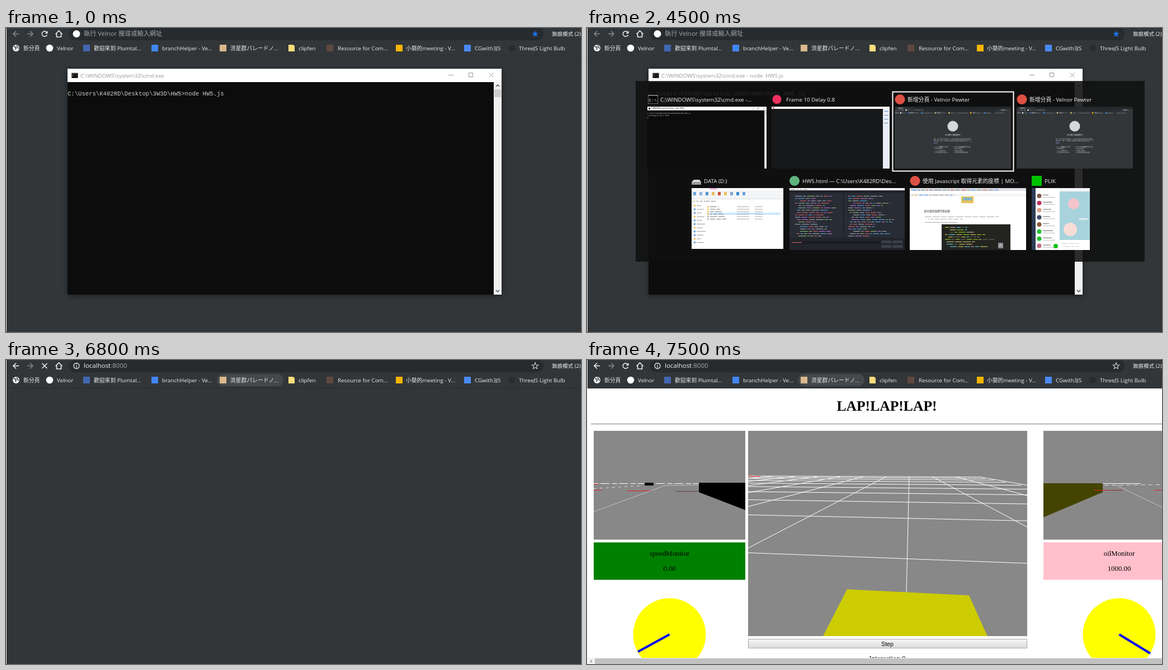
Recreate the animation shown at these times as an HTML page with a canvas. Size 1028x545 px, loop 8 s.

```html
<!DOCTYPE html>
<html lang="zh-Hant">
<head>
<meta charset="utf-8">
<title>Desktop session</title>
<style>
html, body { margin: 0; width: 100%; height: 100%; overflow: hidden; background: #323639; }
canvas { display: block; }
</style>
</head>
<body>
<canvas id="stage" width="1028" height="545"></canvas>
<script>
const g = document.getElementById('stage').getContext('2d');
const CJK = "'Noto Sans CJK TC','Noto Sans CJK JP','Noto Sans CJK',sans-serif";
const UI = "'Open Sans'," + CJK;
const ROBOTO = 'Roboto,' + CJK;
const SERIF = "'Liberation Serif',serif";
const MONO = "'Liberation Mono',monospace";
const DARK = '#323639';
const PROMPT = 'C:\\Users\\K482RD\\Desktop\\3W3D\\HW5>node HW5.js';

// ---------- helpers ----------
function rect(x, y, w, h, c) { g.fillStyle = c; g.fillRect(x, y, w, h); }
function frame(x, y, w, h, c, lw = 1) { g.strokeStyle = c; g.lineWidth = lw; g.strokeRect(x, y, w, h); }
function disc(x, y, r, c) { g.fillStyle = c; g.beginPath(); g.arc(x, y, r, 0, 7); g.fill(); }
function ring(x, y, r, c, lw, a = 0, b = 2 * Math.PI) {
  g.strokeStyle = c; g.lineWidth = lw; g.beginPath(); g.arc(x, y, r, a, b); g.stroke();
}
function pill(x, y, w, h, r, c) { g.fillStyle = c; g.beginPath(); g.roundRect(x, y, w, h, r); g.fill(); }
function path(p) {
  g.beginPath();
  for (let i = 0; i < p.length; i += 2) g.lineTo(p[i], p[i + 1]);
}
function poly(c, ...p) { path(p); g.fillStyle = c; g.fill(); }
function stroke(c, lw, ...p) { path(p); g.strokeStyle = c; g.lineWidth = lw; g.stroke(); }
function dotted(dash, c, lw, ...p) { g.setLineDash(dash); stroke(c, lw, ...p); g.setLineDash([]); }
function text(s, x, y, c, size = 9.8, font = UI, align = 'left') {
  g.font = (typeof size === 'number' ? size + 'px ' : size + ' ') + font;
  g.fillStyle = c; g.textAlign = align; g.fillText(s, x, y);
  return x + g.measureText(s).width;
}
function clipped(x, y, w, h, draw) {
  g.save(); g.beginPath(); g.rect(x, y, w, h); g.clip(); draw(); g.restore();
}
function mini(x, y, w, h, scale, dx, dy, draw) {
  clipped(x, y, w, h, () => { g.translate(dx, dy); g.scale(scale, scale); draw(); });
}
function random(seed) {
  return () => (seed = (seed * 16807) % 2147483647) / 2147483647;
}
// rows of short coloured dashes that read as tiny text
function scribble(x, y, w, rows, step, colors, seed) {
  const rnd = random(seed);
  for (let i = 0; i < rows; i++) {
    let px = x + Math.floor(rnd() * 4) * 3;
    const end = x + w * (0.35 + 0.6 * rnd());
    while (px < end) {
      const len = 3 + rnd() * 11;
      rect(px, y + i * step, Math.min(len, end - px), 1, colors[Math.floor(rnd() * colors.length)]);
      px += len + 2;
    }
  }
}

// ---------- browser ----------
function star(x, y, c, filled) {
  const p = [];
  for (let i = 0; i < 10; i++) {
    const r = i % 2 ? 2.6 : 6, a = i * Math.PI / 5 - Math.PI / 2;
    p.push(x + r * Math.cos(a), y + r * Math.sin(a));
  }
  path(p); g.closePath();
  if (filled) { g.fillStyle = c; g.fill(); }
  else { g.strokeStyle = c; g.lineWidth = 1.1; g.stroke(); }
}
function arrow(x, dir, c) {
  stroke(c, 1.6, x - 5 * dir, 10.5, x + 5 * dir, 10.5);
  stroke(c, 1.6, x, 5.5, x + 5 * dir, 10.5, x, 15.5);
}
function bookmarks(hover) {
  if (hover) pill(377, 25, 119, 22, 11, '#45484b');
  const label = (s, x) => text(s, x, 39.7, '#eceded');
  const box = (x, c) => rect(x - 6, 30, 12, 12, c);
  disc(18, 36, 6, '#f1f1f1');
  stroke(DARK, 1.5, 14, 33, 18, 35, 17, 39);
  stroke(DARK, 1.5, 19, 31, 21, 35, 23, 37);
  disc(78, 36, 6.3, '#fff');
  box(144, '#4267b2'); box(266, '#4285f4'); box(388, '#d9b98c');
  poly('#fbdc7c', 505, 30, 513, 30, 516, 32, 516, 42, 505, 42);
  box(579, '#5f483f'); box(703, '#f4b400'); box(825, '#4a8af4');
  disc(904, 36, 6, '#292c2f');
  label('新分頁', 31);
  label('Velnor', 91);
  label('歡迎來到 Plumtal...', 157);
  label('branchHelper - Ve...', 279);
  label('流星群パレードノ...', 401);
  label('clipfen', 523);
  label('Resource for Com...', 593);
  label('小葵的meeting - V...', 715);
  label('CGwith3JS', 838);
  label('ThreeJS Light Bulb', 917);
}
function newTab() {
  disc(543, 155.5, 47.5, '#d6d7d8');
  text('你已進入無痕模式', 543, 239, '#e0e1e2', '300 17.3px', CJK, 'center');
  const grey = '#b9bcbf', white = '#f4f4f4', link = '#8ab4f8';
  const put = (s, x, y, c = grey) => text(s, x, y, c, 11.1, ROBOTO);
  put('現在，你可以進行私密瀏覽了。共用這部裝置的其他使用者不會看到', 372, 276);
  put('你的活動，不過，你下載的內容和新增的書籤仍會保留在裝置上。', 372, 292);
  put('瞭', 697, 292, link);
  put('解詳情', 372, 308, link);
  put('Pewter', 372, 343);
  put('下列資訊：', put('不會儲存', 414, 343, white), 343);
  put('你的活動：', put('可能仍會看到', put('以下各方', 546, 343), 343, white), 343);
  const list = (x, items) => items.forEach((s, i) => {
    disc(x - 10, 358.5 + 16 * i, 1.7, grey);
    put(s, x, 362 + 16 * i);
  });
  list(385, ['你的瀏覽記錄', 'Cookie 和網站資料', '你在表單中輸入的資訊']);
  list(558, ['你造訪的網站', '你的雇主或學校', '你的網際網路服務供應商']);
}
function popup() {
  g.save();
  g.shadowColor = 'rgba(0,0,0,.45)'; g.shadowBlur = 6; g.shadowOffsetY = 1;
  pill(107, -4, 859, 210, 10, '#292c2f');
  g.restore();
  rect(107, 27, 859, 29, '#45484b');
  ['localhost:8000', 'localhost:8000 - Velnor 搜尋', 'localhost:3000', 'localhost', 'location', 'local storage']
    .forEach((s, i) => {
      const y = 41.5 + 29 * i;
      ring(125, y - 1, 3.6, '#9aa0a6', 1.3);
      stroke('#9aa0a6', 1.3, 128, y + 2, 131, y + 5);
      text(s, 139, y + 4, i % 2 ? '#dfe1e3' : '#8ab4f8', 11.5);
    });
}
function address(t) {
  const open = t >= 5400 && t < 6500, typing = t >= 5400 && t < 6600;
  const focus = t >= 4600 && t < 6600;
  if (open) popup();
  else pill(112, -1, 849, 23, 11.5, focus ? '#34383b' : '#282b2e');
  if (focus && !open) {
    g.strokeStyle = '#6a7d9b'; g.lineWidth = 2;
    g.beginPath(); g.roundRect(112, -1, 848, 22.5, 11.2); g.stroke();
  }
  if (t < 5400) disc(126, 10.5, 6.5, '#fff');
  else {
    ring(126, 10.5, 5, '#e4e5e6', 1.3);
    rect(125.4, 9.7, 1.3, 4, '#e4e5e6'); rect(125.4, 7.3, 1.3, 1.4, '#e4e5e6');
  }
  if (t < 4600) text('執行 Velnor 搜尋或輸入網址', 139, 14.3, '#a3a6a9', 11.2);
  else if (t >= 4700 && t < 5200) rect(139, 2, 1, 15, '#fff');
  if (typing) {
    const url = 'localhost:8000', n = Math.min(4, 1 + Math.floor((t - 5400) / 100));
    const x = text(url.slice(0, n), 139, 14, '#fff', 11.5);
    rect(x, 2, g.measureText(url.slice(n)).width, 16, '#4a78b8');
    text(url.slice(n), x, 14, '#fff', 11.5);
  } else if (t >= 6600) {
    text(':8000', text('localhost', 139, 14, '#f4f4f4', 11.5), 14, '#a3a6a9', 11.5);
  }
  if (!typing) star(946, 10.8, t < 5400 ? '#1a73e8' : '#d5d7d9', t < 5400);
}
function browser(t) {
  rect(0, 0, 1028, 545, DARK);
  if (t < 6800) newTab();
  else if (t >= 6900) page(t >= 7400);
  rect(0, 0, 1028, 51, DARK);
  rect(0, 50, 1028, 1, '#2a2d30');
  arrow(18, -1, t >= 6800 ? '#f1f1f1' : '#85888b');
  arrow(43, 1, '#85888b');
  if (t >= 6600 && t < 7500) {
    stroke('#f1f1f1', 1.6, 64.5, 6, 73.5, 15);
    stroke('#f1f1f1', 1.6, 73.5, 6, 64.5, 15);
  } else {
    ring(69, 10.5, 4.7, '#f1f1f1', 1.6, 0.4, 5.5);
    poly('#f1f1f1', 74.5, 5, 74.5, 10, 69.5, 10);
  }
  stroke('#f1f1f1', 1.6, 88.5, 11, 94.5, 5, 100.5, 11);
  stroke('#f1f1f1', 1.6, 90.5, 10, 90.5, 16, 98.5, 16, 98.5, 10);
  text('無痕模式 (2)', 976, 14, '#f1f1f1', 9.5);
  bookmarks(t >= 4600);
  address(t);
  rect(0, 0, 1, 545, '#f0f0f0');
}

// ---------- web page ----------
function roadView() {
  clipped(288, 127, 499, 368, () => {
    rect(288, 127, 499, 368, '#888');
    const vx = 576.5, vy = 187.5;
    const slope = k => 1.905 * k - 0.024;
    for (let k = -7; k <= 3; k++)
      stroke('#fff', 1, vx + slope(k) * 21.5, vy + 21.5, vx + slope(k) * 400, vy + 400);
    for (let j = 0; j < 10; j++) {
      const h = 1 / (0.00597 + 0.0045 * j);
      const at = k => {
        const x = vx + slope(k) * h;
        return [x, vy + h * (1 + 0.000227 * (x - 537))];
      };
      stroke('#fff', 1, ...at(-7), ...at(3));
    }
    stroke('#e02020', 1, 288, 208.5, 310, 208.5);
    poly('#cc0', 465, 411, 683, 422, 716, 495, 422, 495);
  });
}
function sideViews() {
  const red = (x1, x2, y, c = '#e02020') => stroke(c, 1, x1, y, x2, y);
  rect(12, 127, 271, 195, '#888');
  dotted([9, 3, 16, 5], '#fff', 1, 12, 221.5, 200, 221.5);
  dotted([5, 6], '#ddd', 1, 12, 230.5, 95, 225.5);
  dotted([1, 1], '#fff', 1, 12, 272, 140, 225, 200, 224);
  red(12, 20, 222.5);
  red(12, 26, 233.5);
  red(71, 114, 234.5);
  red(158, 200, 235.5, '#6b4444');
  rect(103, 220, 16, 5, '#000');
  poly('#000', 200, 220, 283, 220, 283, 269, 200, 237);

  rect(816, 127, 212, 195, '#888');
  stroke('#fff', 1, 922, 221.5, 990, 221.5);
  dotted([8, 5], '#ddd', 1, 925, 224.5, 1028, 223.5);
  dotted([1, 1], '#fff', 1, 945, 224, 1028, 264);
  poly('#440', 816, 221, 922, 221, 922, 237, 816, 282);
  red(906, 934, 233.5);
  red(934, 958, 233.5, '#8a3030');
  red(1014, 1028, 233.5);
}
function gauge(x, nx, ny) {
  disc(x, 492, 65, '#ff0');
  stroke('#00f', 4, x, 492, nx, ny);
}
function page(ready) {
  const label = (s, x, y) => text(s, x, y, '#000', 12.8, SERIF, 'center');
  rect(0, 51, 1028, 494, '#fff');
  text('LAP!LAP!LAP!', 536, 91, '#000', 'bold 25.6px', SERIF, 'center');
  rect(7, 114, 1021, 1, '#8c8c8c');
  rect(7, 115, 1021, 1, '#e4e4e4');
  const h = ready ? 67 : 195;
  rect(12, 327, 271, h, '#008000');
  rect(816, 327, 212, h, '#ffc0cb');
  label('speedMonitor', 147.5, 351);
  label('oilMonitor', 951.5, 351);
  if (ready) {
    sideViews();
    roadView();
    label('0.00', 147.5, 378);
    label('1000.00', 951.5, 378);
    gauge(147.5, 91, 523);
    gauge(951.5, 1007, 526);
    label('Interaction 0', 537, 539);
  } else {
    rect(12, 127, 271, 195, '#f00');
    rect(816, 127, 212, 195, '#00f');
  }
  const fill = g.createLinearGradient(0, 500, 0, 517);
  fill.addColorStop(0, '#f6f6f6');
  fill.addColorStop(1, '#dcdcdc');
  rect(288, 500, 499, 17, fill);
  frame(288.5, 500.5, 498, 16, '#a8a8a8');
  text('Step', 537, 512.7, '#000', 10.7, "'Liberation Sans',sans-serif", 'center');
  rect(0, 534, 1028, 11, '#f1f1f1');
  rect(14, 535, 1014, 10, '#c1c1c1');
  poly('#a3a3a3', 5, 540, 8.5, 537, 8.5, 543);
}

// ---------- console ----------
function consoleIcon(x, y, w, h) {
  rect(x, y, w, h, '#9a9a9a');
  rect(x + 0.7, y + 1.5, w - 1.4, h - 2.2, '#000');
  text('C:\\', x + 1.5, y + h * 0.72, '#fff', h * 0.5, MONO);
}
function consoleWindow(t) {
  const active = t >= 2000 && t < 3900;
  g.save();
  g.shadowColor = 'rgba(0,0,0,.45)'; g.shadowBlur = 9; g.shadowOffsetY = 2;
  rect(110, 73, 776, 405, '#0c0c0c');
  g.restore();
  rect(110, 73, 776, 24, '#fff');
  consoleIcon(117, 80, 12, 10);
  const ink = active ? '#000' : '#999';
  text('C:\\WINDOWS\\system32\\cmd.exe' + (t >= 2600 ? ' - node  HW5.js' : ''), 133, 88.5, ink);
  rect(791, 84, 9, 1, ink);
  frame(827.5, 80.5, 7, 7, ink);
  stroke(ink, 1, 863.5, 80.5, 871.5, 88.5);
  stroke(ink, 1, 871.5, 80.5, 863.5, 88.5);
  rect(872, 97, 14, 381, '#f0f0f0');
  rect(873, 110, 12, 14, '#cdcdcd');
  stroke('#505050', 1.5, 876, 105, 879, 102, 882, 105);
  stroke('#505050', 1.5, 876, 470, 879, 473, 882, 470);
  const put = (s, y) => text(s, 110, y, '#ccc', 10.6, MONO);
  put(PROMPT, 120.5);
  if (t >= 3100) put('Listening on port 8000', 135.5);
  if (t >= 2400 && t < 2600) rect(390, 119, 6, 3, '#ccc');
  if (t >= 2600 && t < 2900) rect(110, 132, 7, 3, '#ccc');
  if (t >= 3100) rect(110, 145, 7, 3, '#ccc');
  if (active) frame(109.5, 72.5, 777, 406, '#1883d7');
}

// ---------- task switcher ----------
function browserThumb(x) {
  rect(x, 141, 208, 111, DARK);
  mini(x, 141, 208, 111, 0.2, x - 4.6, 145, () => browser(0));
  rect(x, 141, 208, 4, '#24272a');
  rect(x + 3, 142, 30, 3, DARK);
  rect(x + 6, 143, 9, 1, '#bbb');
}
function explorerThumb() {
  rect(187, 287, 164, 109, '#fff');
  rect(220, 287, 12, 3, '#f3b6e6');
  rect(187, 291, 164, 15, '#f3f4f5');
  ['#6aa4dc', '#8ab6e0', '#5b93cf', '#e8bf5a', '#d04a3a', '#e8bf5a', '#7fa7d0', '#3d8ad0', '#6aa4dc']
    .forEach((c, i) => rect(190 + 11 * i, 294, 5, 6, c));
  rect(187, 306, 164, 1, '#ddd');
  scribble(190, 310, 60, 1, 3, ['#888'], 4);
  for (let i = 0; i < 11; i++) {
    rect(191, 317 + 6.6 * i, 3, 3, i % 3 ? '#5a9ad8' : '#e8bf5a');
    rect(196, 318 + 6.6 * i, 8 + (i * 5) % 9, 1, '#999');
  }
  rect(214, 331, 132, 4, '#cce8ff');
  for (let i = 0; i < 6; i++) {
    rect(215, 319 + 4.4 * i, 3, 3, i < 4 ? '#f3cf72' : '#b8c4d0');
    scribble(220, 320 + 4.4 * i, 34, 1, 4, ['#777'], 9 + i);
    rect(268, 320 + 4.4 * i, 22, 1, '#aaa');
    rect(300, 320 + 4.4 * i, 14, 1, '#aaa');
  }
}
function editorThumb() {
  const inks = ['#c678dd', '#98c379', '#61afef', '#abb2bf', '#e06c75', '#abb2bf'];
  rect(362, 287, 206, 111, '#282c34');
  rect(362, 287, 206, 4, '#fff');
  scribble(364, 289, 60, 1, 3, ['#777'], 2);
  rect(362, 291, 206, 5, '#21252b');
  rect(458, 291, 1, 85, '#181a1f');
  scribble(372, 301, 82, 18, 4.2, inks, 21);
  scribble(467, 301, 96, 18, 4.2, inks, 57);
  rect(362, 376, 206, 22, '#21252b');
  rect(364, 382, 160, 5, '#1b1d23');
  rect(366, 384, 18, 1, '#e06c75');
  for (let i = 0; i < 4; i++) rect(526 + 20 * (i % 2), 381 + 8 * (i >> 1), 18, 5, '#3a3f4b');
}
function articleThumb() {
  rect(577, 287, 208, 111, '#fff');
  rect(577, 287, 208, 5, '#dee1e6');
  rect(577, 297, 208, 5, '#f4f5f6');
  scribble(580, 290, 190, 1, 3, ['#6f7780', '#d04a3a', '#4285f4'], 6);
  scribble(580, 299, 200, 1, 3, ['#888', '#4285f4', '#d9a441'], 8);
  rect(669, 302, 22, 12, '#e6c35c');
  rect(672, 304, 16, 5, '#7fb3c8');
  text('如何取得座標的程式碼', 603, 330, '#333', '500 4.6px', CJK);
  scribble(604, 338, 170, 2, 4, ['#aaa'], 13);
  rect(604, 348, 58, 1, '#aaa');
  rect(634, 352, 123, 46, '#23241f');
  scribble(640, 357, 100, 9, 4.3, ['#66d9ef', '#a6e22e', '#e6db74', '#cfcfc2', '#75715e'], 31);
  rect(735, 385, 9, 10, '#8a8f94');
  stroke('#fff', 1, 737, 391, 739.5, 388.5, 742, 391);
}
function chatThumb() {
  rect(795, 287, 104, 111, '#fff');
  rect(795, 287, 7, 111, '#2d3b55');
  ['#7d5a4c', '#b8315a', '#d8a08c', '#3f4b6b', '#8b5a3a', '#20c030', '#20c030', '#c06a80'].forEach((c, i) => {
    const y = 301 + 12.8 * i;
    disc(808.5, y, 4, c);
    rect(815, y - 2, 10 + (i * 7) % 9, 1, '#666');
    rect(815, y + 2, 22, 1, '#bbb');
  });
  disc(838, 391, 4, '#06c013');
  rect(845, 293, 54, 87, '#a8d3dc');
  rect(845, 287, 54, 6, '#f4f5f6');
  disc(870, 315, 10, '#f5c3cc');
  disc(864, 361, 12, '#f8dcd6');
  rect(880, 341, 15, 3, '#d9eef2');
  scribble(848, 386, 44, 2, 5, ['#ccc'], 5);
}
function switcher(t) {
  const title = (s, x, y) => text(s, x, y, '#f2f2f2');
  rect(87, 95, 910, 324, 'rgba(17,17,17,.88)');
  frame((t < 4200 ? 327 : 546) + 0.5, 114.5, 216, 142, '#fff', 2);

  consoleIcon(109, 120, 18, 16);
  title('C:\\WINDOWS\\system32\\cmd.exe -...', 131, 132);
  mini(108, 141, 213, 111, 0.2745, 77.8, 121, () => consoleWindow(3200));

  disc(339.5, 128, 8, '#f0305c');
  title('Frame 10 Delay 0.8', 356, 132);
  rect(330, 141, 211, 111, '#17181a');
  rect(330, 141, 211, 4, '#fff');
  rect(332, 142, 3, 2, '#f0305c');
  rect(529, 145, 12, 107, '#e8edf3');
  for (let i = 0; i < 4; i++) rect(531, 149 + 7 * i, 8, 1, '#6b8fc0');

  for (const x of [550, 768]) {
    disc(x + 9.5, 128, 9, '#dd5144');
    title('新增分頁 - Velnor Pewter', x + 23, 132);
    browserThumb(x);
  }

  poly('#d8d8d8', 187, 276, 191, 272, 201, 272, 204, 276);
  rect(187, 276, 17, 5, '#9a9a9a');
  title('DATA (D:)', 209, 278);
  explorerThumb();

  disc(371, 274, 9, '#5fb57d');
  title('HW5.html — C:\\Users\\K482RD\\Des...', 385, 278);
  editorThumb();

  disc(586.5, 274, 9, '#dd5144');
  title('使用 Javascript 取得元素的座標 | MO...', 600, 278);
  articleThumb();

  rect(795, 265, 18, 18, '#00c300');
  title('PLIK', 818, 278);
  chatThumb();
}

// ---------- schedule ----------
function draw() {
  const t = performance.now() % 8000;
  browser(t);
  if (t < 4600) consoleWindow(t);
  if (t >= 3900 && t < 4700) {
    g.globalAlpha = t < 4000 ? 0.6 : t < 4600 ? 1 : 0.3;
    switcher(t);
    g.globalAlpha = 1;
  }
  requestAnimationFrame(draw);
}
draw();
</script>
</body>
</html>
```
